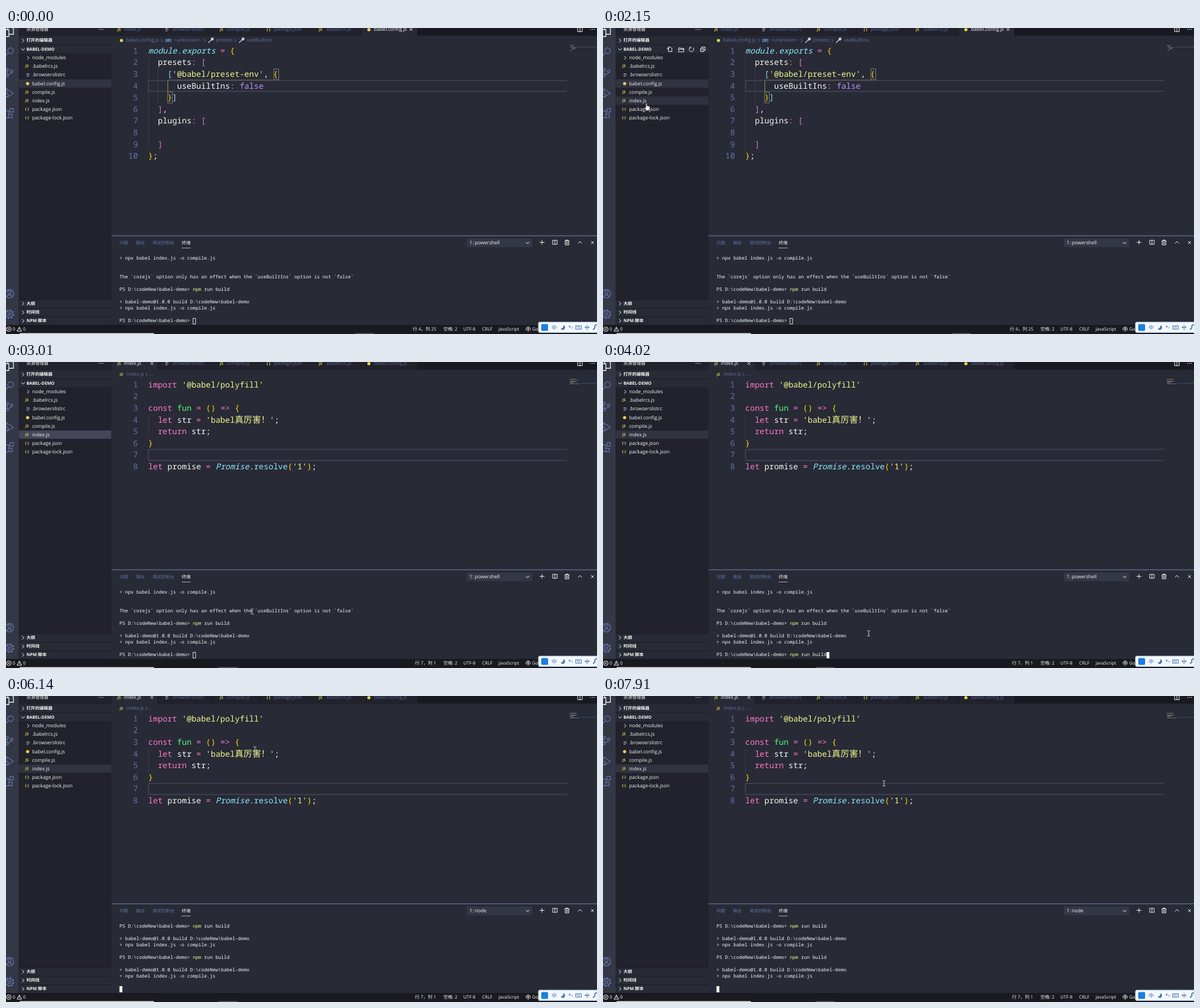
Animation, 1039 px wide and 539 px high, one loop 7990 ms. Source, as an HTML page:

```html
<!DOCTYPE html>
<html lang="zh-CN">
<head>
<meta charset="utf-8">
<title>Editor session</title>
<style>
html, body { margin: 0; width: 100%; height: 100%; overflow: hidden; background: #282a36; }
svg { display: block; width: 1039px; height: 539px; }
text { white-space: pre; text-rendering: geometricPrecision; fill: #f8f8f2; transform: translateY(-.7px);
  font: 8.65px 'Open Sans', 'Noto Sans CJK SC', 'Noto Sans CJK', sans-serif; }
.code text { font: 500 14.1px 'Noto Sans Mono', 'Noto Sans CJK SC', 'DejaVu Sans Mono', monospace; }
.code .han { font-size: 15.35px; font-weight: 300; }
.term text { font: 500 8.27px 'Noto Sans Mono', 'DejaVu Sans Mono', monospace; }
.head text { font-size: 7.6px; font-weight: 700; }
.small text { font-size: 7.95px; }
.panel text { font-size: 7.7px; }
.dim text, text.dim { fill: #6272a4; }
.tabs text { fill: #5a6897; }
text.on { fill: #f8f8f2; }
text.js { font-size: 6.5px; font-weight: 700; fill: #e8d44d; }
.nums text { fill: #6272a4; text-anchor: end; }
.k { fill: #ff79c6; } .s { fill: #f1fa8c; } .f { fill: #50fa7b; } .n { fill: #bd93f9; }
.c { fill: #8be9fd; } .i { font-style: italic; }
.g, text.g { fill: #ffd700; } .o { fill: #da70d6; } .b { fill: #87cefa; }
.line { fill: none; stroke: #f8f8f2; stroke-width: 1; }
.faint { fill: none; stroke: #6272a4; stroke-width: 1.3; }

/* every timed part shares one 7990 ms loop */
.t { animation: 7990ms step-end infinite; }
.before { animation-name: before; }
.after { animation-name: after; }
.plain { animation-name: plain; }
.parsed { animation-name: parsed; }
.actions { animation-name: actions; }
.hover1 { animation-name: hover1; }
.hover2 { animation-name: hover2; }
.focus { animation-name: focus; }
.blur { animation-name: blur; }
.hollow { animation-name: hollow; }
.solid { animation-name: solid; }
.typed { animation-name: typed; }
.log1 { animation-name: log1; }
.log2 { animation-name: log2; }
.log3 { animation-name: log3; }
.running { animation-name: running; }
.shell { animation-name: shell; }
.cmd { animation-name: cmd; }
.node { animation-name: node; }
.mark { animation-name: mark; }
.tip { animation-name: tip; }
.beam { animation-name: beam; }
.hand { animation-name: hand; }
.mouse { animation: move 7990ms linear infinite; }
@keyframes before { 0% { visibility: visible } 29.04%, to { visibility: hidden } }
@keyframes after { 0% { visibility: hidden } 29.04%, to { visibility: visible } }
@keyframes plain { 0% { visibility: hidden } 29.04% { visibility: visible } 32.04%, to { visibility: hidden } }
@keyframes parsed { 0% { visibility: hidden } 32.04%, to { visibility: visible } }
@keyframes actions { 0% { visibility: hidden } 17.77% { visibility: visible } 33.04%, to { visibility: hidden } }
@keyframes hover1 { 0% { visibility: hidden } 17.77% { visibility: visible } 25.03%, to { visibility: hidden } }
@keyframes hover2 { 0% { visibility: hidden } 25.03% { visibility: visible } 29.04%, to { visibility: hidden } }
@keyframes focus { 0% { visibility: hidden } 29.04% { visibility: visible } 39.8%, to { visibility: hidden } }
@keyframes blur { 0% { visibility: hidden } 39.8%, to { visibility: visible } }
@keyframes hollow { 0% { visibility: visible } 39.8%, to { visibility: hidden } }
@keyframes solid { 0% { visibility: hidden } 39.8% { visibility: visible } 50.31%, to { visibility: hidden } }
@keyframes typed { 0% { visibility: hidden } 50.31% { visibility: visible } 60.08%, to { visibility: hidden } }
@keyframes log1 { 0% { visibility: visible } 60.08%, to { visibility: hidden } }
@keyframes log2 { 0% { visibility: hidden } 60.08% { visibility: visible } 75.72%, to { visibility: hidden } }
@keyframes log3 { 0% { visibility: hidden } 75.72%, to { visibility: visible } }
@keyframes running { 0% { visibility: hidden } 60.08%, to { visibility: visible } }
@keyframes shell { 0% { visibility: visible } 61.2%, to { visibility: hidden } }
@keyframes cmd { 0% { visibility: hidden } 61.2% { visibility: visible } 63.08%, to { visibility: hidden } }
@keyframes node { 0% { visibility: hidden } 63.08%, to { visibility: visible } }
@keyframes mark { 0% { visibility: hidden } 91.36% { visibility: visible } 97.12%, to { visibility: hidden } }
@keyframes tip { 0% { opacity: 0 } 91.36% { opacity: .2 } 92.49% { opacity: .8 } 93.4% { opacity: 1 } 97.12%, to { opacity: 0 } }
@keyframes beam { 0% { visibility: hidden } 4.5% { visibility: visible } 17.77% { visibility: hidden } 33.04%, to { visibility: visible } }
@keyframes hand { 0% { visibility: hidden } 17.77% { visibility: visible } 33.04%, to { visibility: hidden } }
@keyframes move {
  0%, 4.5% { transform: translate(905px, 485px) }
  10.51% { transform: translate(520px, 180px) }
  12.52% { transform: translate(424px, 100px) }
  13.52% { transform: translate(440px, 125px) }
  17.77% { transform: translate(185px, 150px) }
  22.03%, 23.03% { transform: translate(121px, 142px) }
  25.03% { transform: translate(90px, 141px) }
  28.16%, 32.04% { transform: translate(70px, 137px) }
  33.04% { transform: translate(185px, 200px) }
  34.79% { transform: translate(330px, 340px) }
  38.8% { transform: translate(472px, 478px) }
  41.8%, 69.84% { transform: translate(467px, 478px) }
  72.84% { transform: translate(488.5px, 338px) }
  76.85%, 77.7% { transform: translate(437.5px, 94px) }
  80.1% { transform: translate(385px, 42px) }
  84.48% { transform: translate(400px, 43px) }
  85.5% { transform: translate(401px, 44px) }
  87.36%, 93.4% { transform: translate(379.5px, 42px) }
  95.1% { transform: translate(400px, 70px) }
  99%, to { transform: translate(494px, 154px) }
}
</style>
</head>
<body>
<svg viewBox="0 0 1039 539">
<defs>
  <path id="right" d="M-1.7-3 1.7 0-1.7 3" class="line"/>
  <path id="down" d="M-3-1.6 0 1.6 3-1.6" class="line"/>
  <path id="sep" d="M-1.5-3 1.5 0-1.5 3" fill="none" stroke="#6272a4"/>
  <path id="close" d="M-2.5-2.5 2.5 2.5M2.5-2.5-2.5 2.5" class="line"/>
  <path id="list" d="M-3-2.5h5M-3-.2h6M-3 2.2h4" fill="none" stroke="#a9abb8"/>
  <path id="wrench" d="M-4.2 4 .8-1M.8-1a2.6 2.6 0 0 1 3-3.6L2-2.4 3-1.4 4.8-3a2.6 2.6 0 0 1-4 2" fill="none" stroke="#d5d6da" stroke-width="1.3"/>
  <circle id="dot" r="2.8" fill="#e8d44d"/>
  <path id="split" d="M-4-3.5h8v7h-8zM0-3.5v7" class="line"/>
  <g id="more" fill="#f8f8f2"><circle cx="-3.4" r=".8"/><circle r=".8"/><circle cx="3.4" r=".8"/></g>
</defs>
<rect width="1039" height="539" fill="#282a36"/>

<!-- activity bar -->
<rect width="22" height="523" fill="#343746"/>
<g class="faint">
  <path d="M-3 3h8v12h-8M3 3v-6h6l4 4v10H5" stroke="#f8f8f2"/>
  <circle cx="8" cy="40" r="5"/><path d="m4 44-6 6"/>
  <circle cx="2" cy="73" r="2.2"/><circle cx="2" cy="84" r="2.2"/><circle cx="10" cy="76" r="2.2"/><path d="M2 75v7M10 78q0 3-8 4"/>
  <path d="M1 112v-5l12 8-11 7"/><circle cx="1" cy="118" r="3"/>
  <path d="M-2 146h7v12h-7M5 152h6v6H5M7 142h6v6H7z"/>
  <circle cx="6" cy="468" r="7.5"/><circle cx="6" cy="465.5" r="2.8"/><path d="M1 473q5-6 10 0"/>
  <circle cx="6" cy="504" r="2.4"/><circle cx="6" cy="504" r="6"/><circle cx="6" cy="504" r="7.4" stroke-width="2" stroke-dasharray="2.9 2.9"/>
</g>

<!-- side bar -->
<rect x="22" width="163.5" height="523" fill="#21222c"/>
<rect x="22" y="14.5" width="163.5" height="30" fill="#282a36"/>
<rect x="22" y="478" width="163.5" height="45" fill="#282a36"/>
<path d="M22 29.5h163.5M22 478.5h163.5M22 493.5h163.5M22 508.5h163.5" stroke="#1b1c24"/>
<text x="36" y="5.5" style="font-size:7.7px">资源管理器</text>
<use href="#more" x="167" y="2.5"/>
<g class="head">
  <text x="36" y="25">打开的编辑器</text>
  <text x="36" y="40.5">BABEL-DEMO</text>
  <text x="36" y="488.5">大纲</text>
  <text x="36" y="504">时间线</text>
  <text x="36" y="518.8">NPM 脚本</text>
</g>
<use href="#right" x="30" y="22"/><use href="#down" x="30" y="37.5"/>
<use href="#right" x="30" y="485.5"/><use href="#right" x="30" y="501"/><use href="#right" x="30" y="516"/>
<rect class="t before" x="22.5" y="90.5" width="162.5" height="14.5" fill="#313341"/>
<rect class="t hover1" x="22.5" y="136" width="162.5" height="14.5" fill="#2f313f"/>
<rect class="t hover2" x="22.5" y="120.7" width="162.5" height="14.5" fill="#2f313f"/>
<rect class="t focus" x="22.5" y="120.7" width="162.5" height="14.5" fill="#44475a"/>
<rect class="t blur" x="22.5" y="120.7" width="162.5" height="14.5" fill="#313341"/>
<g class="t actions line">
  <path d="M115 33.5h4l2 2v6h-6zM112.5 36h4M114.5 34v4"/>
  <path d="M133 42v-7h3l1 1h5v6zM133 37.5h9"/>
  <path d="M153 34.5a4 4 0 1 0 5 0M153 32.5v2.5h2.5"/>
  <path d="M171.5 36h5.5v5.5h-5.5zM173.5 36v-2.5h6v6h-2.5M173 38.7h2.5"/>
</g>
<use href="#right" x="39" y="52.5"/>
<text x="34" y="70" class="js">JS</text><use href="#list" x="39" y="83"/><use href="#dot" x="38" y="98"/>
<text x="34" y="115.5" class="js">JS</text><text x="34" y="130.7" class="js">JS</text>
<text x="33.5" y="145.5" class="js">{ }</text><text x="33.5" y="161" class="js">{ }</text>
<text x="46" y="55.6">node_modules</text>
<text x="46" y="71">.babelrcs.js</text>
<text x="46" y="86">.browserslistrc</text>
<text x="46" y="101.3">babel.config.js</text>
<text x="46" y="116.4">compile.js</text>
<text x="46" y="131.6">index.js</text>
<text x="46" y="146.6">package.json</text>
<text x="46" y="162">package-lock.json</text>

<!-- tabs -->
<rect x="185.5" width="854" height="13.5" fill="#191a21"/>
<rect x="185.5" width="537.5" height="13.5" fill="#21222c"/>
<rect class="t before" x="624.5" width="98.5" height="14" fill="#282a36"/>
<rect class="t after" x="185.5" width="81.5" height="14" fill="#282a36"/>
<path d="M267.5 0v13M363.5 0v13M445.5 0v13M537.5 0v13M624.5 0v13" stroke="#191a21"/>
<text x="196" y="5.3" class="js">JS</text><use href="#list" x="283" y="3"/><text x="376" y="5.3" class="js">JS</text>
<text x="458" y="5.3" class="js">{ }</text><text x="550" y="5.3" class="js">JS</text><use href="#dot" x="638" y="3"/>
<g class="tabs">
  <text x="207" y="6" class="t before">index.js</text>
  <text x="207" y="6" class="t after on">index.js</text>
  <text x="291" y="6">.browserslistrc</text>
  <text x="388" y="6">compile.js</text>
  <text x="471" y="6" class="i">package.json</text>
  <text x="562" y="6">.babelrcs.js</text>
  <text x="647" y="6" class="t before on">babel.config.js</text>
  <text x="647" y="6" class="t after">babel.config.js</text>
</g>
<use href="#close" x="712" y="2.5" class="t before"/><use href="#close" x="256.5" y="2.5" class="t after"/>
<use href="#split" x="1009" y="3"/><use href="#more" x="1031" y="2.5"/>

<!-- line numbers shared by both files -->
<g class="code nums">
  <text x="232" y="45.5">1</text><text x="232" y="66.1">2</text><text x="232" y="86.7">3</text><text x="232" y="107.3">4</text>
  <text x="232" y="127.9">5</text><text x="232" y="148.5">6</text><text x="232" y="169.1">7</text><text x="232" y="189.7">8</text>
</g>

<!-- config file -->
<g class="t before">
  <g class="dim">
    <use href="#dot" x="203" y="22"/><text x="211" y="25">babel.config.js</text><use href="#sep" x="274" y="22"/>
    <text x="280" y="24.5" style="fill:#75beff;font-size:7px;font-weight:700">[@]</text>
    <text x="295" y="25">&lt;unknown&gt;</text><use href="#sep" x="349" y="22"/>
    <use href="#wrench" x="360" y="22"/><text x="369" y="25">presets</text><use href="#sep" x="403" y="22"/>
    <use href="#wrench" x="414" y="22"/><text x="423" y="25">useBuiltIns</text>
  </g>
  <path d="M250.5 51v165M267.5 72v62" stroke="#3b3d4b"/>
  <path d="M986 92.5H250.5v19H986" fill="none" stroke="#44475a" stroke-width="1.5"/>
  <path d="M284.5 93v19" stroke="#a39a4a"/><path d="M284 91.5h187" stroke="#655f3c"/>
  <path d="M471 72h8.5v19H471zM284 113h8.5v19H284z" fill="none" stroke="#80816f"/>
  <g class="code">
    <g class="nums"><text x="232" y="210.3">9</text><text x="232" y="230.9">10</text></g>
    <text x="250" y="45.5"><tspan class="c i">module.exports</tspan> <tspan class="k">=</tspan> <tspan class="g">{</tspan></text>
    <text x="266.9" y="66.1">presets<tspan class="k">:</tspan> <tspan class="o">[</tspan></text>
    <text x="283.8" y="86.7"><tspan class="b">[</tspan><tspan class="s">'@babel/preset-env'</tspan>, <tspan class="g">{</tspan></text>
    <text x="300.7" y="107.3">useBuiltIns<tspan class="k">:</tspan> <tspan class="n">false</tspan></text>
    <text x="283.8" y="127.9"><tspan class="g">}</tspan><tspan class="b">]</tspan></text>
    <text x="266.9" y="148.5"><tspan class="o">]</tspan>,</text>
    <text x="266.9" y="169.1">plugins<tspan class="k">:</tspan> <tspan class="o">[</tspan></text>
    <text x="266.9" y="210.3"><tspan class="o">]</tspan></text>
    <text x="250" y="230.9"><tspan class="g">}</tspan>;</text>
  </g>
  <g opacity=".6">
    <path d="M991 30.5h8M992 32.5h6M993 38.5h3M992 40.5h2" stroke="#8d90a0"/>
    <path d="M994 34.5h9M995 36.5h6" stroke="#b8b97c"/><path d="M1005 33.5h34" stroke="#6b6e80"/>
  </g>
</g>

<!-- source file -->
<g class="t after">
  <text x="200" y="24.5" class="js">JS</text><text x="212" y="25" class="dim">index.js</text>
  <path d="M250.5 93v41" stroke="#3b3d4b"/>
  <path d="M986 154H250.5v19.5H986" fill="none" stroke="#44475a" stroke-width="1.5"/>
  <rect class="t mark" x="309" y="30" width="145" height="20.5" fill="#8be9fd50"/>
  <g class="code">
    <text x="250" y="45.5"><tspan class="k">import</tspan> <tspan class="s">'@babel/polyfill'</tspan></text>
    <text x="250" y="86.7"><tspan class="k">const</tspan> <tspan class="f">fun</tspan> <tspan class="k">=</tspan>    <tspan class="k">=&gt;</tspan></text>
    <text x="266.9" y="107.3"><tspan class="k">let</tspan> str <tspan class="k">=</tspan> <tspan class="s">'babel<tspan class="han">真厉害！</tspan>'</tspan>;</text>
    <text x="266.9" y="127.9"><tspan class="k">return</tspan> str;</text>
    <text x="250" y="189.7"><tspan class="k">let</tspan> promise <tspan class="k">=</tspan> <tspan class="c i">Promise</tspan>.<tspan class="c">resolve</tspan> <tspan class="s">'1'</tspan> ;</text>
    <g class="t plain">
      <text x="351.5" y="86.7">()    {</text><text x="250" y="148.5">}</text><text x="495.3" y="189.7">(   )</text>
    </g>
    <g class="t parsed">
      <text x="351.5" y="86.7" class="g">()    {</text><text x="250" y="148.5" class="g">}</text><text x="495.3" y="189.7" class="g">(   )</text>
    </g>
  </g>
  <g class="t parsed"><use href="#sep" x="247" y="22"/><text x="252" y="25" class="dim">...</text></g>
  <g opacity=".65">
    <path d="M991 30.5h12M992 34.5h9M992 36.5h5" stroke="#b8b97c"/>
    <path d="M991 33.5h14" stroke="#a9628c"/><path d="M991 38.5h17" stroke="#6ea9b8"/>
    <path d="M1010 37.5h29" stroke="#44618c"/>
  </g>
</g>

<!-- panel -->
<path d="M185.5 366h853.5" stroke="#8383b6"/>
<g class="panel dim">
  <text x="199.5" y="381.3">问题</text><text x="228.5" y="381.3">输出</text><text x="257.5" y="381.3">调试控制台</text>
  <text x="309" y="381.3" class="on">终端</text>
</g>
<path d="M309 387.5h15.5" stroke="#d0a5c4"/>
<rect x="810" y="371" width="115" height="15" fill="#343746"/>
<text x="815" y="382">1:</text>
<text x="824" y="382" class="t shell">powershell</text>
<text x="824" y="382" class="t cmd">cmd</text>
<text x="824" y="382" class="t node">node</text>
<use href="#down" x="917" y="378.5"/>
<path d="M938 377.5h8.5M942.25 373.5v8" class="line"/>
<use href="#split" x="965" y="377.5"/>
<path d="M982 375h8.5M984.5 375v-1.5h3.5v1.5M983 375v7h6.5v-7M985.3 376.5v4M987.3 376.5v4" class="line"/>
<path d="M1005.5 379.5l3.5-3.5 3.5 3.5" class="line"/><use href="#close" x="1031" y="378"/>

<!-- terminal -->
<g class="term">
  <defs>
    <g id="run"><text>PS D:\codeNew\babel-demo&gt; <tspan class="s">npm</tspan> run build</text></g>
    <g id="out"><text>&gt; babel-demo@1.0.0 build D:\codeNew\babel-demo</text><text y="11">&gt; npx babel index.js -o compile.js</text></g>
    <text id="warn">The `corejs` option only has an effect when the `useBuiltIns` option is not `false`</text>
  </defs>
  <g class="t log1">
    <text x="199.5" y="408.5">&gt; npx babel index.js -o compile.js</text>
    <use href="#warn" x="199.5" y="441.5"/><use href="#run" x="199.5" y="463.5"/><use href="#out" x="199.5" y="485.5"/>
    <text x="199.5" y="518.5">PS D:\codeNew\babel-demo&gt;</text>
  </g>
  <rect class="t hollow" x="328.8" y="511.5" width="4.4" height="10" fill="none" stroke="#f8f8f2" stroke-width=".9"/>
  <rect class="t solid" x="328.5" y="511" width="5" height="11" fill="#f8f8f2"/>
  <g class="t typed"><text x="328.5" y="518.5"><tspan class="s">npm</tspan> run build</text><rect x="393" y="511" width="5" height="11" fill="#f8f8f2"/></g>
  <g class="t log2">
    <use href="#warn" x="199.5" y="430.5"/><use href="#run" x="199.5" y="452.5"/><use href="#out" x="199.5" y="474.5"/>
    <use href="#run" x="199.5" y="507.5"/>
  </g>
  <g class="t log3">
    <use href="#run" x="199.5" y="408.5"/><use href="#out" x="199.5" y="430.5"/>
    <use href="#run" x="199.5" y="463.5"/><use href="#out" x="199.5" y="485.5"/>
  </g>
  <rect class="t running" x="199.5" y="511" width="5" height="11" fill="#f8f8f2"/>
</g>

<!-- status bar -->
<rect y="523" width="1039" height="16" fill="#191a21"/>
<rect x="24" y="537.5" width="236" height="1.5" fill="#e6e6e6"/>
<rect class="t before" x="614" y="537.5" width="33" height="1.5" fill="#55565e"/>
<rect class="t after" x="374" y="537.5" width="33" height="1.5" fill="#55565e"/>
<g class="line"><circle cx="5" cy="530.5" r="4"/><path d="m3.3 528.8 3.4 3.4m0-3.4-3.4 3.4M23.5 526.5l4 7.5h-8zM23.5 529v2.5"/></g>
<g class="small">
  <text x="11.5" y="534">0</text><text x="30" y="534">0</text>
  <text x="715" y="534" class="t before">行 4，列 25</text><text x="719" y="534" class="t after">行 7，列 1</text>
  <text x="769" y="534">空格: 2</text><text x="804" y="534">UTF-8</text><text x="837" y="534">CRLF</text>
  <text x="866" y="534">JavaScript</text><text x="925" y="534">Go</text>
</g>
<g class="line"><path d="M915.5 533a3.7 3.7 0 1 1 5 0M918 530v5"/><circle cx="918" cy="529.8" r="1.3"/></g>

<!-- input method bar -->
<rect x="936" y="518" width="108" height="18.5" rx="2.5" fill="#f4f8fd" stroke="#a9c6e8"/>
<rect x="941" y="521.5" width="12" height="12" rx="2" fill="#1a7fe0"/>
<text x="959" y="531.5" style="font-size:9.5px;fill:#3f74b8">中</text>
<path d="M980 523.5a4.2 4.2 0 1 1-5 6q5 0 5-6z" fill="#3f74b8"/>
<g fill="none" stroke="#3f74b8">
  <circle cx="991" cy="526" r="1.2"/><path d="M995 526.5q1 2-1 3"/>
  <rect x="1001.5" y="524.5" width="10" height="6"/><path d="M1003 526.5h7M1004 528.5h5" stroke-dasharray="1.5 .7"/>
  <path d="M1021.5 523v9M1018.5 525v4M1024.5 525v4M1017.5 527.5h8"/>
  <path d="M1032 531.5l4-4M1036 527.5a2.5 2.5 0 0 1 3-4" stroke-width="1.8"/>
</g>

<!-- hover card -->
<g class="t tip code">
  <rect x="309.5" y="51" width="570" height="46" fill="#282a36" stroke="#55607f"/>
  <text x="315" y="69.5"><tspan class="k">module</tspan> <tspan class="s">"d:/codeNew/babel-demo/node_modules/@babel/polyfill/lib/in</tspan></text>
  <text x="315" y="90"><tspan class="s">dex"</tspan></text>
</g>

<!-- pointer -->
<g class="mouse">
  <path class="t beam" d="M-2.5-4.5h2M.5-4.5h2M0-4v8M-2.5 4.5h2M.5 4.5h2" fill="none" stroke="#dcdce0"/>
  <path class="t hand" d="M-2.5-5.5q1.2-1 1.8.3v3.7l3.7.7q1.5.3 1.4 2l-.6 3.3-.8 2h-4.5l-3-4q-.5-1.4.8-1.3l1.2 1z" fill="#fff" stroke="#15161c" stroke-width=".5"/>
</g>
</svg>
</body>
</html>
```
